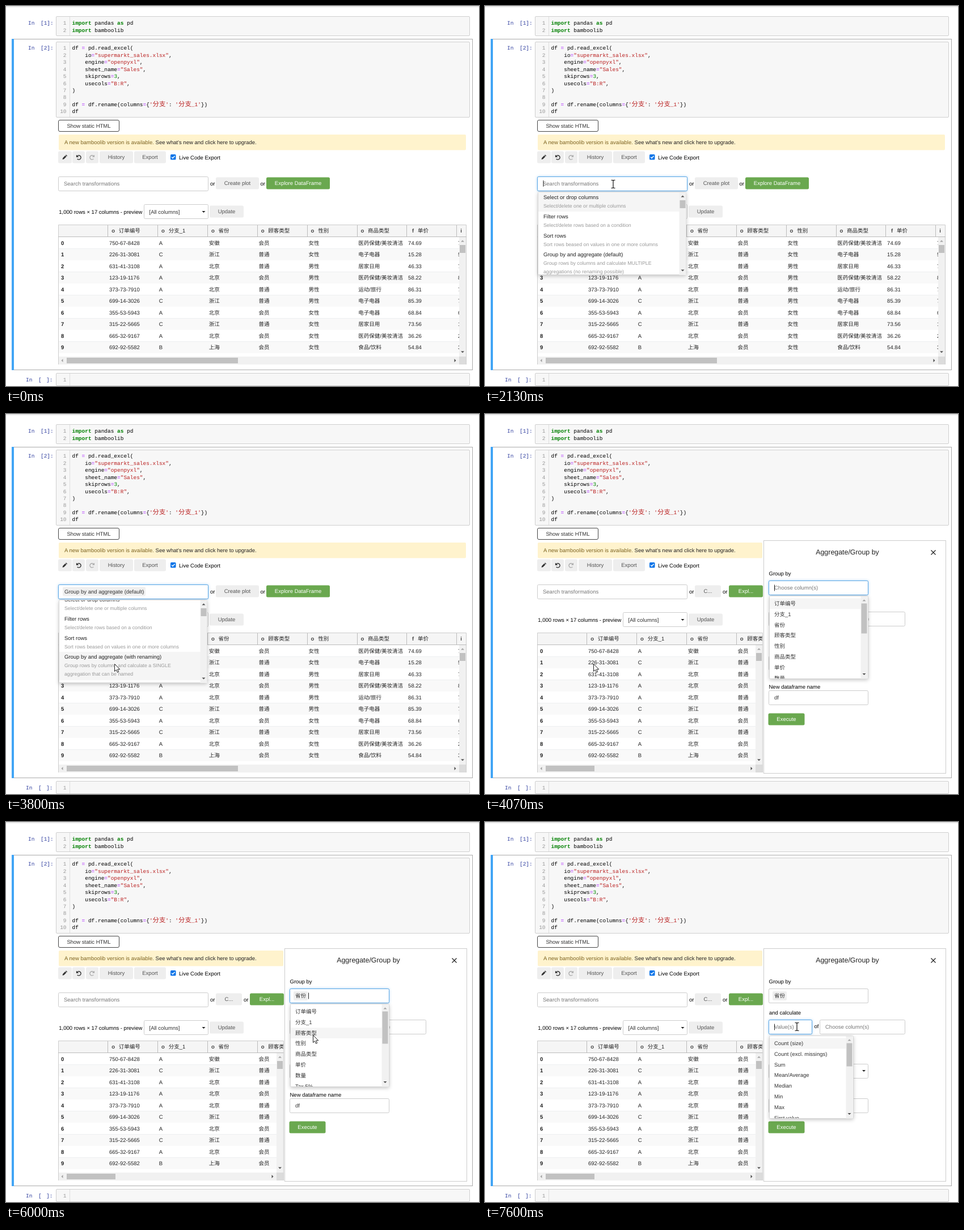
An HTML page that plays this animation: 834x671 px, repeating every 8000 ms.

```html
<!DOCTYPE html>
<html lang="zh-CN">
<head>
<meta charset="utf-8">
<style>
html, body { margin: 0; width: 834px; height: 671px; overflow: hidden; background: #fff; }
svg { display: block; }
text { font: 9.5px "Liberation Sans", Arial, "Noto Sans CJK SC", "Noto Sans CJK", sans-serif; white-space: pre; text-rendering: geometricPrecision; }
.code { font: 9.47px "Liberation Mono", "Courier New", monospace; }
.cjk { font: 11.36px "Noto Sans CJK SC", "Noto Sans CJK", sans-serif; }
.b { font-weight: bold; }
.small { font-size: 8.75px; }
.title { font-size: 12.4px; }
.mid { text-anchor: middle; }
.end { text-anchor: end; }
.menu { filter: drop-shadow(0 2px 3px rgba(0,0,0,.22)); }
.focus { filter: drop-shadow(0 0 2px rgba(102,175,233,.6)); }
</style>
</head>
<body>
<svg id="stage" width="834" height="671" viewBox="0 0 834 671"></svg>
<script>
const LOOP = 8000, STEP = 1000 / 15;
const stage = document.getElementById('stage');
const GREEN = '#6aa84f', GREY = '#c1c1c1', HOVER = '#f5f5f5';

// Drawing helpers; text is placed by its vertical centre, on a whole-pixel baseline.
const rect = (x, y, w, h, fill, stroke = 'none', r = 0, extra = '') =>
  `<rect x="${x}" y="${y}" width="${w}" height="${h}" fill="${fill}" stroke="${stroke}" rx="${r}" ${extra}/>`;
const text = (x, y, s, fill = '#000', cls = '') =>
  `<text x="${x}" y="${Math.round(y + 3.4)}" fill="${fill}" class="${cls}">${s}</text>`;
const path = (d, fill = 'none', stroke = 'none', w = 1) =>
  `<path d="${d}" fill="${fill}" stroke="${stroke}" stroke-width="${w}"/>`;
const clip = (x, y, w, h, body) =>
  `<svg x="${x}" y="${y}" width="${w}" height="${h}" viewBox="${x} ${y} ${w} ${h}">${body}</svg>`;
const button = (x, y, w, s, fill = '#eee', color = '#555') =>
  rect(x, y - .5, w, 21, fill, 'none', 2.5) + text(x + w / 2, y + 10, s, color, 'mid');
const field = (x, y, w, s = '', color = '#777', focus = false) =>
  rect(x + .5, y + .5, w - 1, 25, '#fff', focus ? '#5ba7e6' : '#ccc', 2, focus ? 'class="focus"' : '') +
  text(x + 10, y + 12.5, s, color);
const chip = (x, y, w, s) => rect(x, y - 8, w, 16, '#efefef', 'none', 2) + text(x + 3, y, s, '#333');
const tri = (x, y, dx, dy, fill = '#505050') => dx
  ? path(`M${x - dx * 1.5} ${y - 3}v6l${dx * 3} -3z`, fill)
  : path(`M${x - 3} ${y - dy * 1.5}h6l-3 ${dy * 3}z`, fill);
const vbar = (x, top, bottom, thumb, size, upFill = '#505050') =>
  rect(x, top, 12, bottom - top, '#f1f1f1') + rect(x + 1, thumb, 10, size, GREY) +
  tri(x + 6, top + 7, 0, -1, upFill) + tri(x + 6, bottom - 8, 0, 1);
const caret = (x, y) => rect(x, y - 5.5, 1, 11, '#222');

// Code cells: segments are [colour, string, class]; wide glyphs take two columns.
const COL = 5.683;
function codeLine(n, y, segs) {
  let out = text(106.5, y, n, '#999', 'code end'), col = 0;
  for (const [color, s, cls = ''] of segs) {
    for (const part of s.split(/([\u4e00-\u9fff]+)/)) {
      const wide = part > '\u4e00';
      out += text(116.5 + col * COL, y, part, color, wide ? 'cjk' : 'code ' + cls);
      col += part.length * (wide ? 2 : 1);
    }
  }
  return out;
}
const plain = s => ['#000', s], str = s => ['#ba2121', s], kw = s => ['#008000', s, 'b'];
const op = s => ['#aa22ff', s];
const arg = (name, val, end = ',') => [plain('    ' + name), op('='), val, plain(end)];
const inputBox = (y, h) => rect(88.5, y + .5, 729, h, '#f7f7f7', '#cfcfcf', 1.5) + path(`M112.5 ${y + 1}v${h - 1}`, 'none', '#ddd');
const prompt = (y, x, parts) => text(x, y, 'In', '#303f9f', 'code') +
  parts.map(([px, s]) => text(px, y, s, '#303f9f', 'code')).join('');

function notebook() {
  const lines = [
    [plain('df '), op('='), plain(' pd.read_excel(')],
    arg('io', str('"supermarkt_sales.xlsx"')),
    arg('engine', str('"openpyxl"')),
    arg('sheet_name', str('"Sales"')),
    arg('skiprows', ['#008800', '3']),
    arg('usecols', str('"B:R"')),
    [plain(')')], [],
    [plain('df '), op('='), plain(' df.rename(columns'), op('='), plain('{'), str("'分支'"), plain(': '), str("'分支_1'"), plain('})')],
    [plain('df')]
  ];
  return rect(0, 0, 834, 671, '#fff') + rect(0, 0, 834, 1.5, '#ddd') + rect(0, 1.5, 834, 1, '#f0f0f0') +
    rect(10.5, 58.5, 812, 584, '#fff', '#ababab') + rect(10, 58, 4, 585, '#42a5f5') +
    inputBox(18, 34) + inputBox(63, 133) + inputBox(648, 22) +
    prompt(29.5, 39, [[61, '[1]:']]) + prompt(74, 39, [[61, '[2]:']]) + prompt(659.5, 35, [[57, '['], [71, ']:']]) +
    codeLine(1, 29.5, [kw('import'), plain(' pandas '), kw('as'), plain(' pd')]) +
    codeLine(2, 42.5, [kw('import'), plain(' bamboolib')]) +
    lines.map((l, i) => codeLine(i + 1, 74 + i * 12.42, l)).join('') + codeLine(1, 659.5, []) +
    rect(92.5, 201.5, 107, 20, '#fff', '#444', 2.5) + text(146, 211.5, 'Show static HTML', '#333', 'mid');
}

const HEAD = ['订单编号', '分支_1', '省份', '顾客类型', '性别', '商品类型', '单价'];
const MED = '医药保健/美妆清洁', ELEC = '电子电器', HOME = '居家日用';
const ROWS = [
  ['750-67-8428', 'A', '安徽', '会员', '女性', MED, '74.69', 7],
  ['226-31-3081', 'C', '浙江', '普通', '女性', ELEC, '15.28', 5],
  ['631-41-3108', 'A', '北京', '普通', '男性', HOME, '46.33', 7],
  ['123-19-1176', 'A', '北京', '会员', '男性', MED, '58.22', 8],
  ['373-73-7910', 'A', '北京', '普通', '男性', '运动/旅行', '86.31', 7],
  ['699-14-3026', 'C', '浙江', '普通', '男性', ELEC, '85.39', 7],
  ['355-53-5943', 'A', '北京', '会员', '女性', ELEC, '68.84', 6],
  ['315-22-5665', 'C', '浙江', '普通', '女性', HOME, '73.56', 1],
  ['665-32-9167', 'A', '北京', '会员', '女性', MED, '36.26', 2],
  ['692-92-5582', 'B', '上海', '会员', '女性', '食品/饮料', '54.84', 3],
  ['', '', '安徽', '会员', '女性', '医药保健', '', '']
];
function table(right, thumb) {
  const bar = right - 13, w = right - 92;
  let head = rect(92, 386, w, 22, '#f5f5f5'), body = '';
  HEAD.concat('').forEach((h, i) => {
    const x = 179.8 + i * 87.85;
    head += path(`M${Math.floor(x) + .5} 386v22`, 'none', '#bbb') +
      text(x + 6.4, 397, i < 6 ? 'o' : i < 7 ? ' f' : 'i', '#444', 'b') + text(x + 19, 397, h, '#222');
  });
  ROWS.forEach((row, r) => {
    const y = 408 + r * 20.5;
    body += rect(92, y, w, 20.5, r % 2 ? '#f9f9f9' : '#fff') + path(`M92 ${Math.floor(y + 20.5) + .5}h${w}`, 'none', '#e2e6ea') +
      text(97, y + 10.2, r < 10 ? r : '', '#222', 'b') +
      row.map((v, i) => text(182 + i * 87.85, y + 10.2, v, '#222')).join('');
  });
  return clip(92, 386, w, 22, head) + clip(92, 408, bar - 92, 211, body) +
    vbar(bar, 408, 619, 422, 14, '#a3a3a3') +
    rect(92, 619, w, 14, '#f1f1f1') + rect(bar, 619, 13, 14, '#dcdcdc') + rect(107, 621, thumb, 10, GREY) +
    tri(99, 626, -1, 0, '#a3a3a3') + tri(bar - 7, 626, 1, 0) +
    path(`M92.5 633V386.5H${right - .5}V633`, 'none', '#ccc') + path(`M92 407.5h${w}`, 'none', '#bbb');
}
function widget(narrow) {
  const right = narrow ? 490 : 812;
  const plot = narrow ? button(370, 303, 46, 'C...') + text(419, 313.5, 'or') + button(430, 303, 60, 'Expl...', GREEN, '#fff')
    : button(370, 303, 76, 'Create plot') + text(448.5, 313.5, 'or') + button(459, 303, 112, 'Explore DataFrame', GREEN, '#fff');
  return rect(93, 227, right - 94, 27.5, '#fff3cd', 'none', 2) +
    text(103, 240.5, 'A new bamboolib version is available. <tspan fill="#222">See what\'s new and click here to upgrade.</tspan>', '#7d6421') +
    button(92, 257, 24, '') + button(117, 257, 22, '') + button(141, 257, 22, '') +
    path('M99.5 271l.7 -2.8 4.2 -4.2 2.1 2.1 -4.2 4.2zM105 263.4l1 -1 2.1 2.1 -1 1z', '#333') +
    path('M124.6 263.2v3h3M125 266a3.7 3.7 0 1 1 .6 3.9', 'none', '#333', 1.4) +
    path('M155.4 263.2v3h-3M155 266a3.7 3.7 0 1 0 -.6 3.9', 'none', '#aaa', 1.3) +
    button(165, 257, 59, 'History') + button(226, 257, 56, 'Export') +
    rect(290, 262, 9.5, 9.5, '#0a74e8', 'none', 1.5) + path('M292 266.8l2 2 3.6 -4', 'none', '#fff', 1.4) +
    text(305, 267.5, 'Live Code Export') +
    field(92, 301, 265, 'Search transformations') + text(360, 313.5, 'or') + plot +
    text(93.3, 363.5, '1,000 rows × 17 columns - preview') +
    rect(243.5, 350.5, 113, 25, '#fff', '#ccc', 2) + text(252.5, 363.5, '[All columns]', '#333') + tri(348.5, 363.5, 0, 1, '#222') +
    button(359, 353, 60, 'Update') + table(right, narrow ? 86 : 302);
}
function panel() {
  return rect(491.5, 223.5, 321, 411, '#fff', '#ccc') + text(639, 245, 'Aggregate/Group by', '#222', 'title mid') +
    path('M786.5 240.5l8 8m0 -8l-8 8', 'none', '#222', 1.2) +
    text(500.5, 281.5, 'Group by') + field(500, 294, 176, 'Choose column(s)') +
    text(501, 336.5, 'and calculate') + field(500, 349, 77, 'Value(s)') + text(580.5, 360.5, 'of') +
    field(590, 349, 151, 'Choose column(s)') +
    field(500, 427, 176) + tri(668, 439.5, 0, 1, '#222') +
    text(500.5, 481.5, 'New dataframe name') + field(500, 488, 176, 'df', '#333') +
    button(499.5, 529, 64, 'Execute', GREEN, '#fff');
}

// Layers shown during given spans of time.
const layers = [];
function layer(body, ...spans) {
  const g = document.createElementNS('http://www.w3.org/2000/svg', 'g');
  g.innerHTML = body;
  stage.append(g);
  layers.push([g, spans]);
  return g;
}
const menuBox = (x, y, w, h) => rect(x, y, w, h, '#fff', '#d5d5d5', 2, 'class="menu"');

const TRANSFORMS = [
  [329, 34, 'Select or drop columns', 'Select/delete one or multiple columns'],
  [363, 33.5, 'Filter rows', 'Select/delete rows based on a condition'],
  [396.5, 33.5, 'Sort rows', 'Sort rows beased on values in one or more columns']
];
const GROUP = (kind, a, b) => [430, 50, `Group by and aggregate (${kind})`, a, b];
const DEFAULT = GROUP('default', 'Group rows by columns and calculate MULTIPLE', 'aggregations (no renaming possible)');
const RENAME = GROUP('with renaming', 'Group rows by columns and calculate a SINGLE', 'aggregation that can be named');
function searchMenu(last, hover, scroll) {
  const items = [...TRANSFORMS, last].map(([y, h, name, ...notes], i) =>
    (i === hover ? rect(94, y - scroll, 249, h, HOVER) : '') + text(103, y + 8.8 - scroll, name, '#222') +
    notes.map((s, k) => text(103, y + 23.6 + k * 14.8 - scroll, s, '#999', 'small')).join('')).join('');
  return menuBox(93.5, 328.5, 261, 146) + clip(94, 329, 249, 145.5, items) + vbar(342.5, 329, 475, 343, 14);
}
function listMenu(x, y, w, items, hover, thumb) {
  const rows = items.map((s, i) => (i === hover ? rect(x, y + 4.5 + i * 18.85, w - 13, 18.85, HOVER) : '') +
    text(x + 9, y + 13.5 + i * 18.85, s, '#333')).join('');
  return menuBox(x + .5, y + .5, w - 1, 146) + clip(x + 1, y + 1, w - 14, 145, rows) +
    vbar(x + w - 13.5, y + 1, y + 146.5, y + 13.5, thumb, '#a3a3a3');
}

const COLUMNS = [...HEAD, '数量', 'Tax 5%'];
const REST = COLUMNS.filter(c => c !== '省份');
const STATS = ['Count (size)', 'Count (excl. missings)', 'Sum', 'Mean/Average', 'Median', 'Min', 'Max', 'First value'];

layer(notebook(), [0, LOOP]);
layer(widget(false), [0, 3930]);
layer(widget(true), [3930, LOOP]);

const search = s => field(92, 301, 265, s, '#777', true);
layer(search('Search transformations'), [2070, 3600]);
layer(search('') + chip(100, 313.5, 146, 'Group by and aggregate (default)'), [3600, 3930]);
layer(caret(102.5, 313.5), [2070, 2600], [3070, 3600]);
[2070, 2330, 2470, 2600, 2930].forEach((t, i, a) =>
  layer(searchMenu(DEFAULT, Math.min(i, 3), i === 4 ? 10 : 0), [t, a[i + 1] || 3600]));
layer(searchMenu(RENAME, 3, 10), [3600, 3930]);

layer(panel(), [3930, LOOP]);
const groupBy = (s, focus) => field(500, 294, 176, s, '#777', focus);
layer(groupBy('Choose column(s)', true), [4000, 5470]);
layer(groupBy('', true), [5470, 6670]);
layer(groupBy('', false), [6670, LOOP]);
layer(chip(507, 307, 25, '省份'), [5470, LOOP]);
layer(caret(510, 307), [4070, 4600], [5070, 5470]);
layer(caret(533, 307), [5470, 6070], [6530, 6670]);
const groupMenu = (items, hover, thumb) => listMenu(501, 321, 175, items, hover, thumb);
layer(groupMenu(COLUMNS, 0, 53), [4070, 4930]);
layer(groupMenu(COLUMNS, 3, 53), [4930, 5000]);
layer(groupMenu(COLUMNS, 2, 53), [5000, 5470]);
layer(groupMenu(REST, 2, 57), [5470, 6130]);
layer(groupMenu(REST, 1, 57), [6130, 6670]);
layer(field(500, 349, 77, 'Value(s)', '#777', true) + caret(510, 362) + listMenu(501, 377, 149, STATS, 0, 41), [7600, LOOP]);

// Pointer: time, x, y.
const TRACK = [
  [660, 268, 60], [860, 421, 112], [1000, 399, 167], [1470, 326, 249], [1870, 226, 314],
  [2130, 226, 314], [2730, 215, 436], [2900, 215, 436], [3330, 191, 441],
  [4200, 191, 441], [4930, 537, 388], [5070, 525, 374], [5270, 513, 374],
  [5940, 513, 374], [6000, 541, 376], [6600, 715, 309], [6870, 715, 309], [7330, 550, 361], [LOOP, 550, 361]
];
const arrow = layer(path('M.5 .5v13l3 -2.8 2 4.6 2.2 -1 -2 -4.4h4.1z', '#fff', '#222', 1), [660, LOOP]);
const beam = layer(path('M-3.5 -6.5h2.5l1 1 1 -1h2.5M0 -5.5v12M-3.5 7.5h2.5l1 -1 1 1h2.5', 'none', '#111', 1.2), [660, LOOP]);

function pointer(t) {
  const i = Math.max(0, TRACK.findIndex(k => k[0] > t) - 1);
  const [t0, x0, y0] = TRACK[i], [t1, x1, y1] = TRACK[i + 1];
  const u = Math.max(0, (t - t0) / (t1 - t0)), e = u * u * (3 - 2 * u);
  return [x0 + (x1 - x0) * e, y0 + (y1 - y0) * e];
}
const inText = (x, y, t) => t < 1300 ? y < 196 : t < 2400 ? y > 301 && y < 327
  : t > 6900 && y > 350 && (x < 577 || x > 591);

function render(ms) {
  const t = Math.floor(ms / STEP + .06) * STEP + 5;
  for (const [g, spans] of layers)
    g.style.display = spans.some(([a, b]) => t >= a && t < b) ? '' : 'none';
  const [x, y] = pointer(t).map(Math.round), at = `translate(${x} ${y})`;
  arrow.setAttribute('transform', at);
  beam.setAttribute('transform', at);
  (inText(x, y, t) ? arrow : beam).style.display = 'none';
}
const start = performance.now();
function tick() {
  render((performance.now() - start) % LOOP);
  requestAnimationFrame(tick);
}
tick();
</script>
</body>
</html>
```
